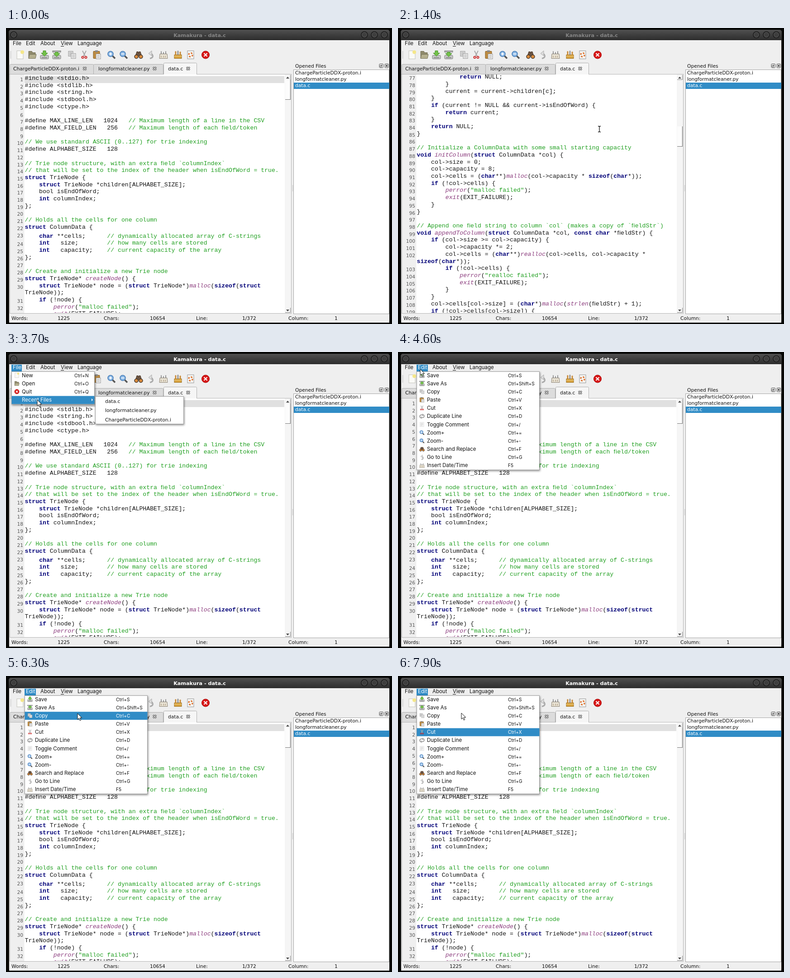
An HTML page for the animation above (8 s loop, 853 by 656 pixels).

```html
<!DOCTYPE html>
<html lang="en">
<head>
<meta charset="utf-8">
<title>Text editor</title>
<style>
html, body { margin: 0; width: 100%; height: 100%; overflow: hidden; background: #050605; }
svg { display: block; }
text { font: 10.67px "DejaVu Sans", sans-serif; fill: #111; white-space: pre; }
.title { font: bold 11.2px "DejaVu Sans", sans-serif; text-anchor: middle; }
.menu { font: 11.5px Inter, sans-serif; font-feature-settings: "calt" 0; }
.keys { font: 10.2px Inter, sans-serif; font-feature-settings: "calt" 0; }
.num { text-anchor: end; fill: #555; }
.code { font: 13.18px "Liberation Mono", monospace; }
.kw { font-weight: bold; fill: #000078; }
.fn { font-style: italic; fill: #8a3a7c; }
.str, .com { fill: #1f9f1f; }
.lit { fill: #fff; }
.popup { filter: drop-shadow(1px 2px 2px #0007); }
</style>
</head>
<body>
<svg id="stage" width="853" height="656" viewBox="0 0 853 656"></svg>

<script id="listing" type="text/plain">
#include <stdio.h>
#include <stdlib.h>
#include <string.h>
#include <stdbool.h>
#include <ctype.h>

#define MAX_LINE_LEN   1024   // Maximum length of a line in the CSV
#define MAX_FIELD_LEN   256   // Maximum length of each field/token

// We use standard ASCII (0..127) for trie indexing
#define ALPHABET_SIZE   128

// Trie node structure, with an extra field `columnIndex`
// that will be set to the index of the header when isEndOfWord = true.
struct TrieNode {
    struct TrieNode *children[ALPHABET_SIZE];
    bool isEndOfWord;
    int columnIndex;
};

// Holds all the cells for one column
struct ColumnData {
    char **cells;      // dynamically allocated array of C-strings
    int   size;        // how many cells are stored
    int   capacity;    // current capacity of the array
};

// Create and initialize a new Trie node
struct TrieNode* createNode() {
    struct TrieNode* node = (struct TrieNode*)malloc(sizeof(struct TrieNode));
    if (!node) {
        perror("malloc failed");
        exit(EXIT_FAILURE);
    }
    node->isEndOfWord = false;
    node->columnIndex = -1;
    for (int i = 0; i < ALPHABET_SIZE; i++) {
        node->children[i] = NULL;
    }
    return node;
}

// Insert a header string into the Trie with its column index
void insertTrie(struct TrieNode* root, const char* headerName, int columnIndex) {
    struct TrieNode* current = root;
    for (int i = 0; headerName[i] != '\0'; i++) {
        unsigned char c = (unsigned char)headerName[i];
        if (c >= ALPHABET_SIZE) {
            // Skip characters outside of the ASCII range
            continue;
        }
        if (current->children[c] == NULL) {
            current->children[c] = createNode();
        }
        current = current->children[c];
    }
    current->isEndOfWord = true;
    current->columnIndex = columnIndex;
}

// Search for a word in the Trie
// Returns the node that ends the word,
// or NULL if it is not present
struct TrieNode* searchTrie(struct TrieNode* root, const char* searchWord) {
    if (root == NULL || searchWord == NULL) {
        return NULL;
    }

    // Walk down one node per character
    struct TrieNode* current = root;
    int i = 0;

    for (i = 0; searchWord[i] != '\0'; i++) {
        unsigned char c = (unsigned char)searchWord[i];
        // Stop as soon as the path ends
        if (c >= ALPHABET_SIZE || current->children[c] == NULL) {
            return NULL;
        }
        current = current->children[c];
    }
    if (current != NULL && current->isEndOfWord) {
        return current;
    }
    return NULL;
}

// Initialize a ColumnData with some small starting capacity
void initColumn(struct ColumnData *col) {
    col->size = 0;
    col->capacity = 8;
    col->cells = (char**)malloc(col->capacity * sizeof(char*));
    if (!col->cells) {
        perror("malloc failed");
        exit(EXIT_FAILURE);
    }
}

// Append one field string to column `col` (makes a copy of `fieldStr`)
void appendToColumn(struct ColumnData *col, const char *fieldStr) {
    if (col->size >= col->capacity) {
        col->capacity *= 2;
        col->cells = (char**)realloc(col->cells, col->capacity * sizeof(char*));
        if (!col->cells) {
            perror("realloc failed");
            exit(EXIT_FAILURE);
        }
    }
    col->cells[col->size] = (char*)malloc(strlen(fieldStr) + 1);
    if (!col->cells[col->size]) {
</script>

<script>
const $ = id => document.getElementById(id);
const esc = s => s.replace(/&/g, '&amp;').replace(/</g, '&lt;').replace(/>/g, '&gt;');
const text = (x, y, s, cls = '') => `<text x="${x}" y="${y}" class="${cls}">${s}</text>`;
const rect = (x, y, w, h, fill, more = '') =>
  `<rect x="${x}" y="${y}" width="${w}" height="${h}" fill="${fill}" ${more}/>`;
const path = (d, stroke, width = 1, fill = 'none') =>
  `<path d="${d}" stroke="${stroke}" stroke-width="${width}" fill="${fill}"/>`;
const circle = (x, y, r, fill, more = '') => `<circle cx="${x}" cy="${y}" r="${r}" fill="${fill}" ${more}/>`;
const at = (x, y, s, scale = 1) => `<g transform="translate(${x} ${y}) scale(${scale})">${s}</g>`;

const BLUE = '#308cc6', LINE = 15.71, WRAP = 72, ROW = 18.18, MENU_TOP = 42.4;

// Icons are drawn around 0,0 in a 20 pixel box
const drive = rect(-9, 1, 18, 8, '#c9cbc9', 'rx="1.5" stroke="#777"') + rect(-6, 5, 12, 2, '#888');
const lens = sign => path('M2 2L8 8', '#555', 3.5) +
  circle(-2, -2, 6, '#8db9e6', 'stroke="#4a7fb8" stroke-width="1.6"') + path(sign, '#fff', 2);
const sheet = (x, y, fill) => rect(x, y, 10, 11, fill, 'stroke="#999"') +
  path(`M${x + 2} ${y + 3}h6m-6 2.5h6m-6 2.5h6`, '#aaa');
const icon = {
  new: rect(-7, -9, 14, 18, '#fafaf7', 'stroke="#c4c4bd"') + circle(5, -6, 4, '#f5e789'),
  open: path('M-8 8V-8H-1L1-5H7V0', '#77735a', 1, '#8f8a6c') + path('M-8 8L-6-1H9L7 8Z', '#77735a', 1, '#b5b08f'),
  save: drive + path('M-3-9H3V-4H7L0 3L-7-4H-3Z', '#3f8d20', 1, '#73c248'),
  saveAs: drive + rect(-9, -9, 18, 3, '#bbb', 'stroke="#777"') + path('M-3-6H3V-3H7L0 4L-7-3H-3Z', '#3f8d20', 1, '#73c248'),
  copy: sheet(-8, -8, '#ddd') + sheet(-2, -3, '#eee'),
  cut: path('M-4-9L2 3M4-9L-2 3', '#a9a9a9', 2) + circle(-3.5, 5.5, 2.2, 'none', 'stroke="#cc2222" stroke-width="1.7"') +
    circle(3.5, 5.5, 2.2, 'none', 'stroke="#cc2222" stroke-width="1.7"'),
  paste: rect(-8, -8, 14, 16, '#bd8b41', 'rx="1" stroke="#876023"') + rect(-4, -10, 6, 4, '#888') + sheet(-2, -2, '#f2f2f2'),
  dup: path('M-7 5C-11-5-3-6 3-5M7-5C11 5 3 6-3 5', '#888', 2.5) + path('M2-9L7-5L2-1ZM-2 1L-7 5L-2 9Z', '#888', 1, '#bbb'),
  comment: rect(-8, -8, 15, 16, '#f3f3f3', 'stroke="#ddd"') + path('M-5-4H4M-5 0H4M-5 4H1', '#ccc', 1.5),
  zoomIn: lens('M-5-2H1M-2-5V1'),
  zoomOut: lens('M-5-2H1'),
  find: path('M-7 3L-4-7H-1L0-3L1-7H4L7 3', '#4b3a2d', 1, '#6d5543') + circle(-5, 4, 4, '#d98b3c', 'stroke="#40342b" stroke-width="1.5"') +
    circle(5, 4, 4, '#d98b3c', 'stroke="#40342b" stroke-width="1.5"'),
  goto: path('M-2 8C8 6 5-2-2-3', '#aaa', 3) + path('M-5-3L2-9V2Z', '#aaa', 1, '#ddd'),
  date: path('M-8-2H8L9 8H-9Z', '#8b8172', 1, '#e9e3d5') + path('M-5-2V-8M0-2V-6M5-2V-8', '#777', 1.5) +
    path('M-5 2V6M0 2V6M4 2V6', '#a8967a', 1.3),
  tools: rect(-8, 0, 16, 8, '#d8a33f', 'stroke="#9a7023"') + path('M-5 0V-8M5 0V-7', '#c98b3a', 3) + path('M0 0V-9', '#777', 2) + path('M-8 3H8', '#f0d38c'),
  help: rect(-7, -9, 14, 18, '#f4f4f1', 'stroke="#999"') + circle(0, 0, 4.2, 'none', 'stroke="#dd6b25" stroke-width="3" stroke-dasharray="3.3"'),
  quit: circle(0, 0, 8.5, '#d81616', 'stroke="#a50c0c"') + path('M-3.5-3.5L3.5 3.5M3.5-3.5L-3.5 3.5', '#fff', 2.2),
};

const menus = {
  file: { name: 'File', x: 12, w: 184, textX: 35, keysX: 151, bar: [12, 23], items: [
    ['new', 'New', 'Ctrl+N'], ['open', 'Open', 'Ctrl+O'], ['quit', 'Quit', 'Ctrl+Q'], ['', 'Recent Files', '']] },
  edit: { name: 'Edit', x: 41, w: 272, textX: 64, keysX: 243, bar: [41, 25], items: [
    ['save', 'Save', 'Ctrl+S'], ['saveAs', 'Save As', 'Ctrl+Shift+S'], ['copy', 'Copy', 'Ctrl+C'],
    ['paste', 'Paste', 'Ctrl+V'], ['cut', 'Cut', 'Ctrl+X'], ['dup', 'Duplicate Line', 'Ctrl+D'],
    ['comment', 'Toggle Comment', 'Ctrl+/'], ['zoomIn', 'Zoom+', 'Ctrl+='], ['zoomOut', 'Zoom-', 'Ctrl+-'],
    ['find', 'Search and Replace', 'Ctrl+F'], ['goto', 'Go to Line', 'Ctrl+G'], ['date', 'Insert Date/Time', 'F5']] },
};
const files = ['ChargeParticleDDX-proton.i', 'longformatcleaner.py', 'data.c'];
const barItems = { File: 15, Edit: 44, About: 76, View: 121, Language: 158 };

// [time, value...] keys, linear in between
const pointerKeys = [[300, 638, 330], [400, 555, 275], [500, 445, 224], [1500, 445, 224], [2100, 435, 218],
  [2200, 420, 205], [2400, 288, 119], [2800, 24, 35], [3200, 24, 35], [3500, 62, 98], [3700, 69, 106],
  [3800, 69, 106], [4200, 66, 62], [4600, 49, 38], [4700, 49, 38], [4800, 66, 31], [4900, 66, 31],
  [5300, 145, 215], [5400, 153, 239], [5600, 157, 253], [5800, 157, 236], [6200, 158, 105], [6300, 158, 83],
  [6500, 156, 64], [6600, 156, 64], [7100, 152, 190], [7200, 152, 190], [7600, 150, 161], [7800, 150, 161], [7900, 140, 82]];
const scrollKeys = [[500, 0], [600, 96], [1000, 864], [1200, 1104], [1300, 1200], [1400, 1248], [1500, 1248],
  [1600, 1152], [1900, 480], [2000, 288], [2100, 144], [2200, 0]];

function sample(keys, t) {
  if (t <= keys[0][0]) return keys[0].slice(1);
  const i = keys.findIndex(k => k[0] >= t);
  if (i < 0) return keys.at(-1).slice(1);
  const [a, b] = [keys[i - 1], keys[i]], u = (t - a[0]) / (b[0] - a[0]);
  return a.slice(1).map((v, j) => v + (b[j + 1] - v) * u);
}

const syntax = /(\/\/.*)|("[^"]*")|\b(struct|int|char|void|if|for|return|const|sizeof|unsigned|continue)\b|(\w+)(?=\()/g;
const highlight = s => esc(s).replace(syntax, (m, com, str, kw) =>
  `<tspan class="${com ? 'com' : str ? 'str' : kw ? 'kw' : 'fn'}">${m}</tspan>`).replace(/fi/g, '\ufb01');

function wrap(line) {
  if (line.length <= WRAP) return [line];
  const cut = line.lastIndexOf(' ', WRAP);
  return [line.slice(0, cut), line.slice(cut + 1)];
}

function listing() {
  let y = 115, out = rect(41, 106.5, 574, 15.5, '#e0e0e0');
  $('listing').textContent.trim().split('\n').forEach((line, i) => {
    out += text(38, y + 3, i + 1, 'num');
    if (i == 22) y += 4; // this line is taller
    for (const row of wrap(line)) {
      out += text(41.5, y, highlight(row), 'code');
      y += LINE;
    }
  });
  return out;
}

const cross = (x, y) => {
  const d = `M${x - 3.4} ${y - 3.4}l6.8 6.8m0-6.8l-6.8 6.8`;
  return path(d, '#5c5c5c', 3.6) + path(d, '#dcdcdc', 1.3);
};
const tab = (x, y, w, fill, name, textX, closeX) =>
  path(`M${x}.5 102.5V${y + 2.5}q0-2 2-2h${w - 4}q2 0 2 2V102.5`, '#b0b0b0', 1, fill) +
  text(textX, 94, name) + cross(closeX, 89.8);
const knob = x => circle(x, 15, 7, '#343434', 'stroke="#1c1c1c" stroke-width="1.6"') +
  circle(x, 15, 5.4, '#3e3e3e', 'stroke="#686868" stroke-width=".7"');
const scrollButton = (y, d) => path(`M617 ${y + 10.5}H628.5V${y}`, '#888') + path(d, 'none', 0, '#444');

function chrome() {
  const tools = { new: 31, open: 58, save: 85, saveAs: 112, copy: 146, cut: 173, paste: 201, zoomIn: 233, zoomOut: 260,
    find: 293, goto: 320, date: 348, tools: 380, help: 408, quit: 441 };
  const status = ['Words:', '1225', 'Chars:', '10654', 'Line:', '1/372', 'Column:', '1'];
  return `<defs><linearGradient id="bar" x2="0" y2="1"><stop stop-color="#505050"/><stop offset="1" stop-color="#2b2b2b"/></linearGradient>
    <clipPath id="view">${rect(10, 103, 606, 528, '#000')}</clipPath></defs>` +
    rect(0, 0, 853, 656, '#050605') + rect(6, 4, 842, 649, '#2b2b2b', 'rx="5"') +
    rect(6, 4, 842, 24, 'url(#bar)', 'rx="5"') + [17, 792, 814, 836].map(knob).join('') +
    rect(7, 27, 840, 626, '#efefef') +
    Object.entries(barItems).map(([s, x]) => text(x, 38, s, 'menu')).join('') + path('M121 40.5h7', '#111') +
    path('M10.5 51V68', '#ccc', 1.5) + Object.entries(tools).map(([k, x]) => at(x, 59.5, icon[k])).join('') +
    path('M7 102.5H631', '#b0b0b0') + tab(8, 80, 185, '#dcdcdc', files[0], 16, 174) +
    tab(193, 80, 154, '#dcdcdc', files[1], 204, 328.5) + tab(348, 77, 73, '#f6f6f6', files[2], 358, 402.5) +
    rect(8.5, 102.5, 622, 530, '#fff', 'stroke="#b5b5b5"') + rect(349, 102, 72, 1, '#f6f6f6') + rect(9, 103, 31.5, 529, '#efefef') +
    rect(616, 103, 14, 529, '#f5f5f5') +
    scrollButton(104, 'M619 112l3.5-4 3.5 4z') + scrollButton(620, 'M619 624l3.5 4 3.5-4z') +
    path('M633.5 348V362', '#d0d0d0', 1.5) + text(639, 88, 'Opened Files') +
    [829, 841].map(x => rect(x - 4, 79.5, 8.5, 8.5, '#eee', 'stroke="#555" rx="1.5"')).join('') +
    circle(828.5, 84.5, 2, 'none', 'stroke="#444"') + path('M829 84l2-2M839 81.5l4.5 4.5m0-4.5l-4.5 4.5', '#333', 1.2) +
    rect(635.5, 92.5, 211, 541, '#fff', 'stroke="#a5a5a5"') + rect(636, 121, 211, 14, BLUE) +
    files.map((f, i) => text(639, 103.3 + i * 14, f, i == 2 ? 'lit' : '')).join('') +
    status.map((s, i) => text(12 + i * 102, 647, s)).join('') +
    `<g clip-path="url(#view)"><g id="code">${listing()}</g></g><g id="live"></g>`;
}

function popup(menu, hover) {
  const h = menu.items.length * ROW, [bx, bw] = menu.bar;
  let out = rect(bx, 28, bw, 15, BLUE) + text(bx + 3, 38, menu.name, 'menu lit') +
    rect(menu.x + .5, 43.5, menu.w - 1, h - .5, '#fff', 'stroke="#a0a0a0" class="popup"');
  menu.items.forEach(([pic, label, keys], i) => {
    const mid = 51.5 + i * ROW, lit = i == hover ? ' lit' : '';
    if (lit) out += rect(menu.x + .5, mid - 8.6, menu.w - 1, 17.8, BLUE);
    if (pic) out += at(menu.x + 12, mid, icon[pic], .6);
    out += text(menu.textX, mid + 4, label, 'menu' + lit) + text(menu.keysX, mid + 4, keys, 'keys' + lit);
    if (label == 'Recent Files') out += path(`M189 ${mid - 3}l3 3-3 3z`, 'none', 0, lit ? '#fff' : '#333');
  });
  return out;
}

const recent = () => rect(197.5, 98.5, 195, 61, '#fff', 'stroke="#a0a0a0" class="popup"') +
  [...files].reverse().map((f, i) => text(219, 112.6 + i * 20.5, f)).join('');

function pointer(t, x, y) {
  if (t < 300) return '';
  if (t < 2500 && x < 616) {
    const beam = 'M-3-6.5Q0-6.5 0-5Q0-6.5 3-6.5M0-5.5V5.5M-3 6.5Q0 6.5 0 5Q0 6.5 3 6.5';
    return at(x, y, path(beam, '#fff', 2.8) + path(beam, '#111', 1.3));
  }
  return at(x, y, path('M0 0V13.5L3.2 10.7L5.4 15.8L7.6 14.8L5.4 9.8H9.8Z', '#111', 1, '#fff'));
}

function draw(t) {
  const [scroll] = sample(scrollKeys, t), [x, y] = sample(pointerKeys, t);
  const hoverY = sample(pointerKeys, t - 50)[1]; // the highlight trails the pointer
  const hover = hoverY < 44 ? -1 : Math.floor((hoverY - MENU_TOP) / ROW);
  const thumb = 114 + scroll / 12;
  let out = `<g fill="${t < 3000 ? '#858585' : '#fff'}">` +
    `<text x="428" y="19.5" class="title" style="fill:inherit">Kamakura - data.c</text></g>` +
    rect(617, thumb, 11, 44, '#fcfcfc') + path(`M617 ${thumb + 44.5}H628.5V${thumb}`, '#777', 1.2);
  if (t >= 3100) out += popup(t < 4600 ? menus.file : menus.edit, hover);
  if (t >= 3600 && t < 4600 && hover == 3) out += recent();
  $('code').setAttribute('transform', `translate(0 ${-scroll})`);
  $('live').innerHTML = out + pointer(t, x, y);
}

$('stage').innerHTML = chrome();
let last = -1;
(function tick() {
  const t = Math.floor(performance.now() % 8000 / 100) * 100;
  if (t != last) draw(last = t);
  requestAnimationFrame(tick);
})();
</script>
</body>
</html>
```
